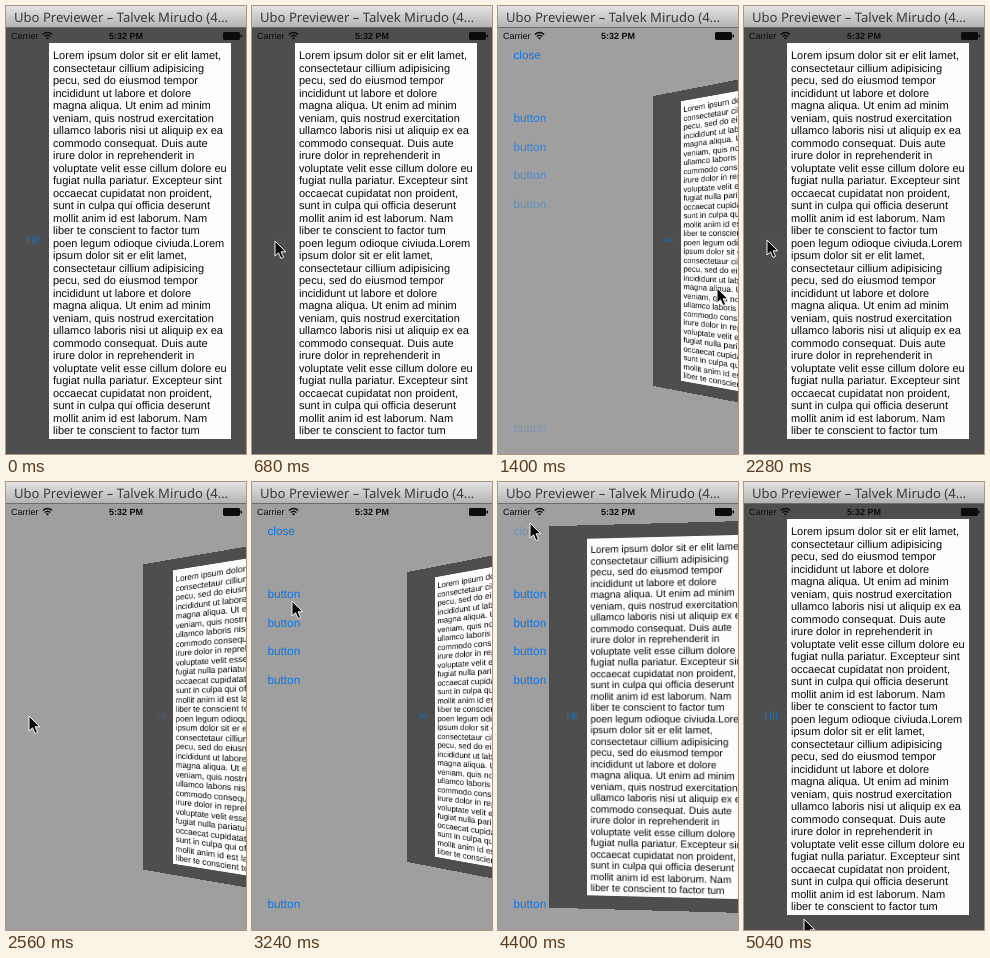
Recreate the animation shown at these times as an HTML page. Size 240 by 448 pixels, loop 5160 ms.

```html
<!DOCTYPE html>
<html lang="en">
<head>
<meta charset="utf-8">
<title>Menu transition</title>
<style>
  html, body { margin: 0; width: 100%; height: 100%; overflow: hidden; background: #9f9f9f; }
  #stage {
    position: relative; width: 240px; height: 448px; overflow: hidden;
    background: #9f9f9f; font-family: "Liberation Sans", Arial, sans-serif;
    text-rendering: geometricPrecision;
  }
  svg { position: absolute; left: 0; top: 0; }
  #page {
    position: absolute; left: 0; top: 22px; width: 240px; height: 426px;
    background: #4e4e4e; transform-origin: 0 213px;
  }
  #copy {
    position: absolute; left: 43px; top: 15px; width: 178px; height: 389px;
    padding: 7px 0 0 4px; background: #fdfdfd; color: #080808;
    font-size: 11px; line-height: 12.5px; white-space: pre; overflow: hidden;
  }
  #hi { position: absolute; left: 20px; top: 206px; font-size: 11.5px; line-height: 14px; color: #1672c4; }
</style>
</head>
<body>
<div id="stage">
  <svg id="menu" width="240" height="448" fill="#0a76ec" font-size="11.8"></svg>

  <div id="page">
    <div id="hi">Hi!</div>
    <div id="copy"></div>
  </div>

  <svg width="240" height="448">
    <defs>
      <linearGradient id="bar" x2="0" y2="1">
        <stop offset="0" stop-color="#e4e4e4"/>
        <stop offset="1" stop-color="#b2b2b2"/>
      </linearGradient>
    </defs>
    <rect width="240" height="22" fill="url(#bar)"/>
    <rect y="21" width="240" height="1" fill="#6c6c6c"/>
    <text x="8" y="16" font-size="13.1" fill="#3c3c3c" font-family="'Noto Sans', 'Open Sans', sans-serif">Ubo Previewer – Talvek Mirudo (4…</text>

    <g fill="#0c0c0c" font-size="9">
      <text x="5" y="33">Carrier</text>
      <text x="120" y="33" text-anchor="middle" font-weight="bold">5:32 PM</text>
      <g fill="none" stroke="#0c0c0c" stroke-width="1.4">
        <path d="M36.8 28.6 Q41.5 24.2 46.2 28.6"/>
        <path d="M38.6 30.6 Q41.5 27.9 44.4 30.6"/>
      </g>
      <path d="M41.5 33.6 L39.9 31.9 Q41.5 30.5 43.1 31.9 Z"/>
      <rect x="217" y="26" width="17" height="8" rx="1.4"/>
      <rect x="234.5" y="28.6" width="1.5" height="2.8" rx=".7"/>
    </g>

    <path id="cursor" d="M0 0 V15 L3.5 11.8 L6 17.5 L8.6 16.4 L6.1 10.8 H10.8 Z"
      fill="#0a0a0a" stroke="#f4f4f4" stroke-width="1"/>
  </svg>
</div>

<script>
const LOOP = 5160, STEP = 40;
const $ = id => document.getElementById(id);
const clamp = v => Math.min(1, Math.max(0, v));
const mix = (a, b, u) => a + (b - a) * u;
const ramp = (t, start, span) => clamp((t - start) / span);
const ease = u => (1 - Math.cos(Math.PI * u)) / 2;

const passage = `consectetaur cillium adipisicing
pecu, sed do eiusmod tempor
incididunt ut labore et dolore
magna aliqua. Ut enim ad minim
veniam, quis nostrud exercitation
ullamco laboris nisi ut aliquip ex ea
commodo consequat. Duis aute
irure dolor in reprehenderit in
voluptate velit esse cillum dolore eu
fugiat nulla pariatur. Excepteur sint
occaecat cupidatat non proident,
sunt in culpa qui officia deserunt
mollit anim id est laborum. Nam
liber te conscient to factor tum`;
$('copy').textContent = [
  'Lorem ipsum dolor sit er elit lamet,', passage,
  'poen legum odioque civiuda.Lorem',
  'ipsum dolor sit er elit lamet,', passage
].join('\n');

const items = [53, 116, 145, 173, 202, 426].map((y, i) => {
  const item = document.createElementNS('http://www.w3.org/2000/svg', 'text');
  item.setAttribute('x', 15.4);
  item.setAttribute('y', y);
  item.textContent = i ? 'button' : 'close';
  return $('menu').appendChild(item);
});

// Each visit to the menu: opening starts, closing starts
const visits = [[729, 1720], [2340, 4201]];
const SWING = 298;

// Pointer stops: time, x, y
const stops = [
  [40, 58, 400], [480, 23, 235], [960, 23, 235], [1360, 219, 282],
  [1760, 219, 282], [2200, 23, 234], [2800, 23, 234], [3240, 40, 119],
  [3560, 32, 41], [4720, 32, 41], [5040, 60, 437]
];

function pointer(t) {
  const i = stops.findIndex(s => s[0] > t);
  if (i < 0) return stops[stops.length - 1].slice(1);
  const a = stops[Math.max(0, i - 1)], b = stops[i];
  const u = ease(ramp(t, a[0], b[0] - a[0] || 1));
  return [mix(a[1], b[1], u), mix(a[2], b[2], u)];
}

// How far the page is open, given how long it takes to close
function opened(t, closing) {
  return visits.reduce((sum, [from, to]) =>
    sum + ease(ramp(t, from, SWING)) - ease(ramp(t, to, closing)), 0);
}

// Push the page back and turn it about its vertical axis, seen from the stage centre
function pose(push, turn) {
  const angle = turn * 29 * Math.PI / 180;
  const depth = 1 + 0.47 * push;
  const shift = -120 + 171.5 * push;
  const tilt = Math.sin(angle) / 395;
  const m = [
    Math.cos(angle) - 120 * tilt, 0, 0, -tilt,
    0, 1, 0, 0,
    0, 0, 1, 0,
    shift + 120 * depth, 0, 0, depth
  ];
  return `matrix3d(${m.map(v => v.toFixed(7)).join()})`;
}

function draw(t) {
  // The turn straightens out before the page is fully back
  $('page').style.transform = pose(opened(t, SWING), opened(t, SWING * 0.85));

  const start = t < visits[1][0] ? visits[0][0] : visits[1][0];
  items.forEach((item, i) => {
    const pressed = i ? 0 : ramp(t, 4080, 80) * 0.7;
    item.setAttribute('opacity', ramp(t, start + 375 + 45 * i, 300) - pressed);
  });

  const pressed = Math.max(
    ramp(t, 560, 40) - ramp(t, 700, 300),
    ramp(t, 2200, 40) - ramp(t, 2340, 300));
  $('hi').style.opacity = 1 - 0.85 * pressed;

  const [x, y] = pointer(t);
  $('cursor').setAttribute('transform', `translate(${x.toFixed(2)} ${y.toFixed(2)})`);
  $('cursor').setAttribute('visibility', t < stops[0][0] ? 'hidden' : 'visible');
}

const begin = performance.now();
function tick() {
  const t = (performance.now() - begin) % LOOP;
  draw(Math.floor(t / STEP) * STEP);
  requestAnimationFrame(tick);
}
tick();
</script>
</body>
</html>
```
